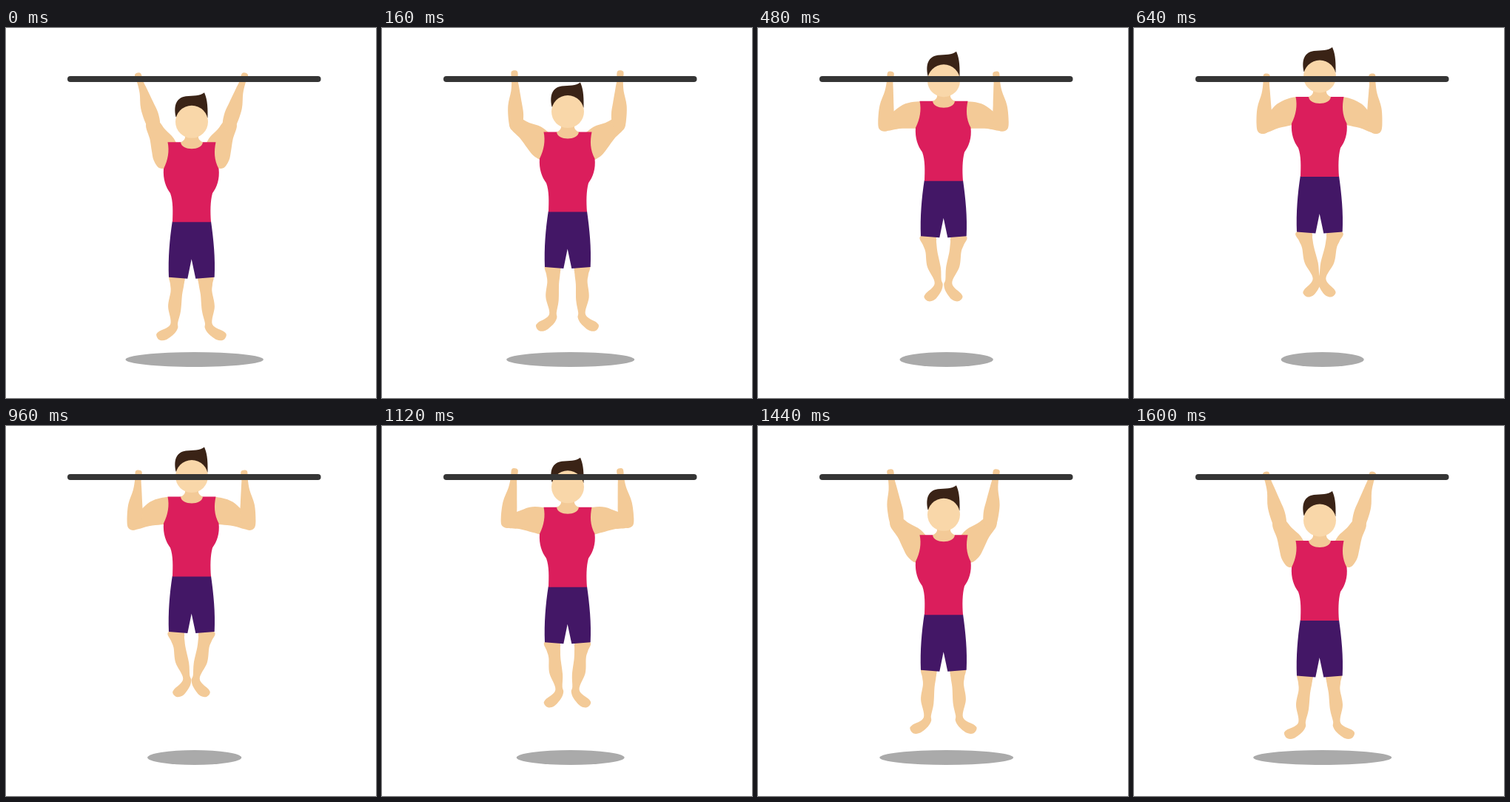
These frames come from a looping animation (500x500 px, 1.76 s). An HTML page with a canvas:

```html
<!DOCTYPE html>
<html lang="en">
<head>
<meta charset="utf-8">
<title>Pull-ups</title>
<style>
html, body { margin: 0; width: 100%; height: 100%; overflow: hidden; background: #fff; }
canvas { display: block; width: 500px; height: 500px; }
</style>
</head>
<body>
<canvas id="stage" width="500" height="500"></canvas>
<script>
const ctx = document.getElementById('stage').getContext('2d');
const LOOP = 1760, STEP = 40, START = -40, END = 1600;
const SKIN = '#f3ca97', FACE = '#f9d7a9', HAIR = '#3a2316', SHIRT = '#db1e5c',
      SHORTS = '#431766', BAR = '#353535', SHADOW = '#aaaaaa';
const CENTER = 250.5, FOREARM = 65.5, UPPER_ARM = 47.6;

const FOREARM_SHAPE = [[-4, -4], [4, -4], [4.5, 8], [6, 18], [9, 38], [11, 54], [9, 70],
  [2, 76], [-6, 74], [-9, 64], [-9.5, 42], [-5, 22], [-4, 8]];
const UPPER_SHAPE = [[-7, 2], [0, 10], [18, 12], [34, 16], [47, 18.5], [60, 15], [63, 0],
  [60, -13], [46, -18], [30, -18], [14, -12], [0, -8]];
const LEG_SHAPE = [[-9.5, -10], [-9, 2], [-8.5, 12], [-12, 32], [-9, 56], [-25, 66], [-28, 71],
  [-24, 77], [-15, 77], [-4, 69], [1, 61], [1, 54], [5, 38], [7, 16], [9.5, 2], [9.5, -10]];

function ease(t, from, to) {
  const u = Math.min(1, Math.max(0, (t - from) / (to - from)));
  return u * u * (3 - 2 * u);
}

// Rises until `top`, stays up until `drop`, then returns to rest.
const cycle = (t, top, drop) => t < drop ? ease(t, START, top) : 1 - ease(t, drop, END);

function fill(color, path) {
  ctx.fillStyle = color;
  ctx.beginPath();
  path();
  ctx.fill();
}

const ellipse = (color, x, y, rx, ry) =>
  fill(color, () => ctx.ellipse(x, y, rx, ry, 0, 0, 2 * Math.PI));

// Closed smooth curve through the points.
function blob(color, points) {
  const n = points.length, at = i => points[(i + n) % n];
  fill(color, () => {
    ctx.moveTo(...points[0]);
    for (let i = 0; i < n; i++) {
      const [a, b, c, d] = [at(i - 1), at(i), at(i + 1), at(i + 2)];
      ctx.bezierCurveTo(b[0] + (c[0] - a[0]) / 6, b[1] + (c[1] - a[1]) / 6,
        c[0] - (d[0] - b[0]) / 6, c[1] - (d[1] - b[1]) / 6, c[0], c[1]);
    }
  });
}

function placed(x, y, angle, draw) {
  ctx.save();
  ctx.translate(x, y);
  ctx.rotate(angle);
  draw();
  ctx.restore();
}

function bothSides(draw) {
  draw();
  ctx.save();
  ctx.translate(2 * CENTER, 0);
  ctx.scale(-1, 1);
  draw();
  ctx.restore();
}

function arm(top, handY) {
  const handX = 179, dx = 217 - handX, dy = top + 18 - handY, reach = Math.hypot(dx, dy);
  const bend = Math.acos(Math.min(1,
    (FOREARM ** 2 + reach ** 2 - UPPER_ARM ** 2) / (2 * FOREARM * reach)));
  const angle = Math.atan2(dy, dx) + bend;
  const ex = FOREARM * Math.cos(angle), ey = FOREARM * Math.sin(angle);
  placed(handX + ex, handY + ey, Math.atan2(dy - ey, dx - ex), () => blob(SKIN, UPPER_SHAPE));
  placed(handX, handY, angle - Math.PI / 2, () => blob(SKIN, FOREARM_SHAPE));
}

function leg(turn) {
  ellipse(SKIN, 231.5, 187, 9.7, 10);
  placed(231, 190, -turn, () => blob(SKIN, LEG_SHAPE));
}

function torso() {
  fill(SHORTS, () => {
    ctx.moveTo(224.8, 107);
    ctx.bezierCurveTo(221, 132, 219, 156, 220, 182.5);
    ctx.lineTo(245.3, 184.5);
    ctx.lineTo(250.7, 158);
    ctx.lineTo(256.3, 184.5);
    ctx.lineTo(281.7, 182.5);
    ctx.bezierCurveTo(283, 156, 280.5, 132, 277, 107);
  });
  fill(SHIRT, () => {
    ctx.moveTo(218.5, 0);
    ctx.bezierCurveTo(221, 12, 219, 24, 213, 36);
    ctx.bezierCurveTo(212, 50, 216, 61, 222, 69);
    ctx.bezierCurveTo(226, 80, 225.5, 94, 225, 108);
    ctx.lineTo(277, 108);
    ctx.bezierCurveTo(276, 94, 276, 80, 279, 69);
    ctx.bezierCurveTo(285, 61, 289, 50, 287.5, 36);
    ctx.bezierCurveTo(281, 24, 281, 12, 283.5, 0);
  });
}

function head() {
  fill(SKIN, () => {
    ctx.moveTo(242, -12);
    ctx.lineTo(242, -6);
    ctx.quadraticCurveTo(241, -2, 236, 0);
    ctx.bezierCurveTo(237, 12, 265, 12, 266, 0);
    ctx.quadraticCurveTo(261, -2, 260, -6);
    ctx.lineTo(260, -12);
  });
  fill(HAIR, () => {
    ctx.moveTo(229.5, -34);
    ctx.bezierCurveTo(226, -51, 231, -60, 243, -62);
    ctx.bezierCurveTo(253, -63, 262, -62, 268, -67);
    ctx.bezierCurveTo(271, -60, 273, -52, 272.5, -33);
  });
  ellipse(FACE, 251, -27.5, 22, 22);
}

function draw(t) {
  const lift = cycle(t, 600, 870);
  const top = 155 - 62 * lift;
  const handY = 67 - 10 * Math.sqrt(lift * (1 - lift));
  const turn = cycle(t, 650, 780) * Math.PI / 9;

  ctx.fillStyle = '#fff';
  ctx.fillRect(0, 0, 500, 500);
  ellipse(SHADOW, 254.7, 448, 93.5 - 38 * cycle(t, 690, 690), 10);
  bothSides(() => arm(top, handY));
  placed(0, top, 0, () => {
    bothSides(() => leg(turn));
    torso();
    head();
  });
  fill(BAR, () => ctx.roundRect(83, 65, 342.5, 8, 4));
}

function tick() {
  const t = performance.now() % LOOP;
  draw(Math.min(END, Math.floor(t / STEP) * STEP));
  requestAnimationFrame(tick);
}
tick();
</script>
</body>
</html>
```
